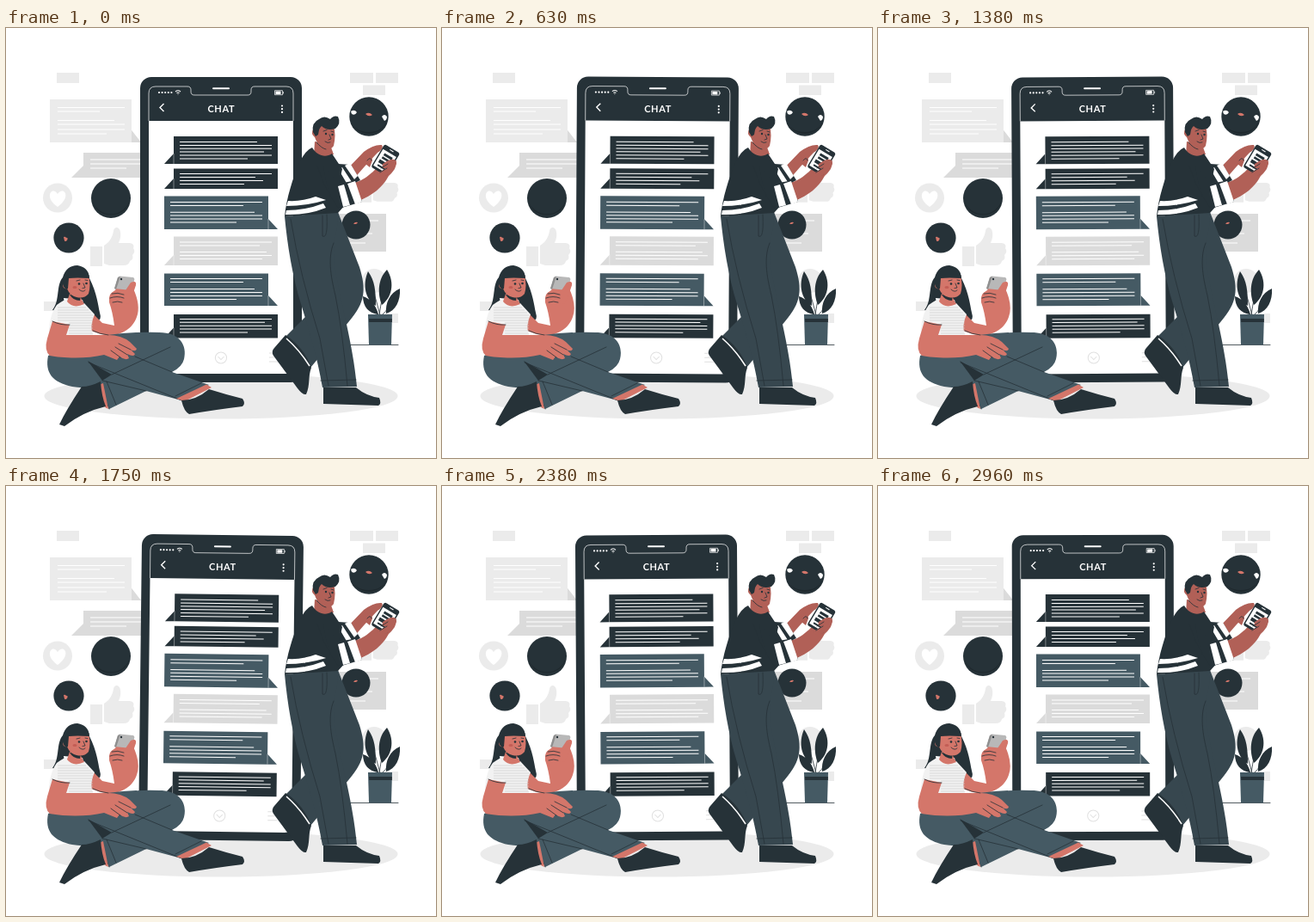
These frames come from a looping animation (500x500 px, 3000 ms). An HTML page:

```html
<!DOCTYPE html>
<html lang="en">
<head>
<meta charset="utf-8">
<title>Chat</title>
<style>
html, body { margin: 0; width: 100%; height: 100%; overflow: hidden; background: #fff; }
svg { display: block; width: 100vw; height: 100vh; }
.ink { fill: #263238; }
.slate { fill: #455a64; }
.navy { fill: #37474f; }
.pale { fill: #ebebeb; }
.grey { fill: #dbdbdb; }
.white { fill: #fff; }
.rose { fill: #d4766a; }
.tan { fill: #b16057; }
.line { fill: none; stroke: #263238; stroke-width: .8; stroke-linecap: round; stroke-linejoin: round; }
.wire { fill: none; stroke: #fff; stroke-width: 1; }
</style>
</head>
<body>
<svg viewBox="0 0 500 500">
  <!-- backdrop -->
  <g class="pale">
    <path d="M59 52h26v12H59zM400 52h27v12H400zM430 52h26v12H430zM415 66.500h26v11.500H415zM44 318h26v11H44zM430 332h26v11H430z"/>
    <path d="M51 83h95v36l11 14H51z"/>
    <circle cx="60" cy="197.500" r="17"/>
    <circle cx="428" cy="294" r="14"/>
    <g id="thumb"><path d="M98 254h14v23H98zM114 253C121 249 124 242 125 236C126 230 132 231 133 237C134 243 132 247 131 250H144Q150 251 148 256Q151 260 147 264Q149 269 144 271Q143 276 137 276H120L114 274z"/></g>
    <use href="#thumb" transform="translate(331 -30) scale(.84)"/>
    <ellipse cx="250" cy="428" rx="205.500" ry="26.500"/>
  </g>
  <path class="white" d="M60 208C43 196 54 183 60 193C67 183 77 196 60 208z"/>
  <path class="grey" d="M146 119L157 133H146zM90 145h76v29H76L90 160zM385 216h57v44h-57z"/>
  <g id="bgText" class="wire"></g>

  <!-- big phone -->
  <g id="phone">
    <rect class="ink" x="156" y="57" width="188" height="355" rx="13"/>
    <path class="white" d="M166 108H334V394Q334 402 326 402H174Q166 402 166 394z"/>
    <path class="wire" stroke-width=".8" d="M166 108V76Q166 68 174 68H211Q215 68 215 72V74Q215 78 219 78H281Q285 78 285 74V72Q285 68 289 68H326Q334 68 334 76V108" style="stroke-width:.7"/>
    <path class="wire" style="stroke-width:2;stroke-linecap:round" d="M241 70.300H259"/>
    <g class="white">
      <circle cx="178" cy="75" r="1.100"/><circle cx="181.600" cy="75" r="1.100"/><circle cx="185.200" cy="75" r="1.100"/><circle cx="188.800" cy="75" r="1.100"/><circle cx="192.400" cy="75" r="1.100"/>
      <circle cx="321" cy="90.500" r="1.100"/><circle cx="321" cy="94.200" r="1.100"/><circle cx="321" cy="97.900" r="1.100"/>
      <path d="M313.500 73.500h6v3.500h-6z"/>
    </g>
    <path class="wire" d="M197 74Q200 71.500 203 74M198.500 75.700Q200 74.500 201.500 75.700M199.600 77H200.400"/>
    <path class="wire" style="stroke-width:.7" d="M312.500 72.700h9v5h-9zM322.500 74v2.500"/>
    <path class="wire" style="stroke-width:1.400" d="M183.500 88L179 92.500L183.500 97"/>
    <text class="white" x="250.300" y="98" text-anchor="middle" font-family="Lato, sans-serif" font-weight="700" font-size="11" letter-spacing=".6">CHAT</text>
    <g id="chat"></g>
    <g fill="none" stroke="#e0e0e0">
      <circle cx="250" cy="383.500" r="6.600"/>
      <path d="M246.500 382L250 385.500L253.500 382M306 378H317M306 383H317M306 388H317"/>
    </g>
  </g>

  <!-- round badges -->
  <g class="ink">
    <circle cx="122" cy="198" r="23"/><circle cx="73" cy="244" r="17.600"/>
    <circle cx="422" cy="103" r="22.700"/><circle cx="407" cy="229" r="16.500"/>
  </g>
  <g fill="#1f292e">
    <path d="M100 200A23 23 0 0 0 144 200Q140 217 122 217Q104 217 100 200zM400 106A22.700 22.700 0 0 0 444 106Q438 121 422 121Q405 121 400 106z"/>
  </g>
  <path class="rose" d="M67 243Q69 242 70 244Q72 243 71.500 246Q70 249 68 247.500zM418 100Q422 97 426 101Q422 104 418 100zM404 227.500Q406 225 409 226Q408 229 404 227.500z"/>
  <path class="white" d="M401 97Q405 94 408 98Q406 102 402 100zM437 103Q440 99 443 103Q443 107 440 108z"/>

  <!-- plant -->
  <path class="line" d="M371 368.500H456M435 334Q431 315 423 297M434 334Q437 312 442 296M434 334Q425 329 419 317M437 334Q446 326 452 312"/>
  <path class="ink" d="M421 283C414 299 418 316 430 323C430 306 429 294 421 283zM443 281C432 292 432 309 437 322C448 314 453 297 443 281zM415 312C415 324 422 332 433 333C430 322 424 315 415 312zM458 303C446 308 441 320 442 332C453 329 459 317 458 303z"/>
  <path class="slate" d="M421 333H449L448 368.500H422z"/>
  <path class="ink" d="M422 338H448.800V342H422.200z"/>

  <!-- standing man -->
  <path class="navy" d="M350 215L386 214L411 278C419 304 418 319 399 341L354 395L325 359L352 332z"/>
  <path class="ink" d="M325 357C339 366 350 380 355 395C351 405 354 415 349 426Q345 427 339 419L311 381Q308 376 312 372z"/>
  <path class="wire" style="stroke-width:1.600" d="M326 361Q341 374 353 393"/>
  <path class="navy" d="M324 219L386 214C387 237 377 252 383 281C389 320 403 364 408 417L368 418C363 386 351 347 343 321C333 289 327 251 324 219z"/>
  <path class="line" d="M373 217C374 238 372 244 368 242V218M381 250C373 269 379 294 383 311Q391 350 397 416M331 222Q342 288 365 361L375 416M366 410L407 409"/>
  <path class="ink" d="M369 418H407Q419 428 434 430Q437 437 433 439L369 437z"/>

  <path class="tan" d="M392 169L416 144Q428 135 437 136Q440 140 432 145L417 161L403 177z"/>
  <path class="ink" d="M371 157L401 159L412 177L386 190z"/>
  <path class="white" d="M387 165L391 162L402 179L397 182zM394 160L400 157L409 172L405 176z"/>
  <path class="tan" d="M359 132L358 149L365 153L381 147L377 136z"/>
  <path class="ink" d="M356 139C362 149 372 151 379 146L391 164L387 181L396 204L386 215L324 219C326 198 334 173 341 157Q348 142 356 139z"/>
  <path class="white" d="M328 201Q344 202 360 196L372 200Q350 207 326 207zM326 212Q348 212 369 204L372 209Q350 218 325 217z"/>
  <path class="ink" d="M369 160L387 181L408 177L414 202L387 210Q373 193 369 160z"/>
  <path class="tan" d="M405 180C423 175 432 160 443 152Q455 149 454 158Q452 166 445 172C438 185 426 195 410 201z"/>
  <path class="white" d="M386 184L393 182L400 206L392 208zM397 181L406 178L414 202L406 205z"/>
  <path class="line" d="M362 160Q369 185 386 209"/>
  <g transform="rotate(31 441 154)">
    <rect class="ink" x="430.500" y="138" width="21" height="31" rx="3"/>
    <path class="white" d="M432 144h18v22h-18z"/>
    <path class="ink" d="M436 147h11v3h-11zM436 151.500h11v2.500h-11zM435 156h11v4h-11zM436 162h11v2h-11z"/>
    <path class="wire" d="M439 140.500h5"/>
  </g>
  <path class="tan" d="M438 158Q449 150 453 154L452 164L440 173Q431 174 432 169L442 163Q436 164 438 158zM419 149Q425 144 426 154L423 162L418 158z"/>
  <path class="line" d="M436 163L444 158M435 168L443 163M420 154Q424 149 425 154"/>

  <path class="tan" d="M360 111L381 114Q384 124 381 137Q377 143 369 140Q362 136 359 127Q354 123 357 118z"/>
  <path class="ink" d="M357 121Q355 110 364 106Q370 101 377 106Q381 101 386 103Q390 111 383 117Q373 120 367 114Q364 116 363 124L360 126z"/>
  <circle class="ink" cx="372" cy="123" r="1.200"/><circle class="ink" cx="379.500" cy="124" r="1.200"/>
  <path class="line" d="M369 120L373 118.500M378 120L381 121M376 124L378 129L375 130M371 132Q374 134.500 377 133M360 119Q358 117 358 121M361 133Q367 140 372 141"/>

  <!-- seated woman -->
  <path class="ink" d="M66 290Q70 276 83 276Q96 278 97 291C106 309 107 322 109 331Q112 340 105 341C96 337 91 326 89 316L67 314Q71 330 54 328C63 317 58 299 66 290z"/>
  <path class="rose" d="M102 333L112 343L126 346Q124 330 120 319Q119 310 127 305L133 294L149 295Q153 297 148 303Q157 323 152 336C147 351 130 361 110 356L93 350z"/>
  <path d="M59 322Q67 316 74 314L91 320L103 333Q97 346 101 357L50 382L50 349Q52 331 59 322z" fill="#f2f2f2"/>
  <g id="stripes" stroke="#c7c7c7" stroke-width=".6"></g>
  <path class="rose" d="M74 309L71 318Q78 327 91 321L86 312z"/>
  <path class="ink" d="M74 310Q78 317 86 317L87 311z"/>
  <path class="rose" d="M70 290Q83 284 96 288Q99 299 96 309Q91 315 82 313Q74 311 71 303Q66 304 66 298Q68 294 71 297z"/>
  <path class="ink" d="M66 298Q66 280 82 277Q96 278 97 291Q82 290 73 291L72 303Q68 305 66 298z"/>
  <circle class="ink" cx="85" cy="297.500" r="1.300"/><circle class="ink" cx="93.500" cy="297" r="1.300"/>
  <path class="line" d="M82 294L86 293M92 293L95 293.500M90 297L92 302L89 302.500M85 304Q89 308 92 305"/>
  <ellipse cx="80" cy="301.500" rx="2.500" ry="1.600" fill="#c25d55"/>
  <path d="M132 288.500L148 290Q150 291 149 294L146 305L126 303L130 290Z" fill="#b8b8b8"/>
  <path d="M130 290L126 303L128 304L133 289z" fill="#8f8f8f"/>
  <circle class="ink" cx="134" cy="292" r="1.200"/>
  <path class="rose" d="M121 310Q126 303 139 305L145 296Q152 293 151 299L147 311L142 321L124 319Q118 318 121 310z"/>
  <path class="line" d="M123 309Q130 307 137 310M121 314Q129 311 137 314M124 319Q130 317 135 319"/>

  <path class="slate" d="M49 381L105 359Q140 353 178 354C202 354 211 369 207 385Q205 394 193 400L236 415L204 433L163 422L120 443L108 415Q93 420 77 417C54 412 45 401 49 381z"/>
  <path class="ink" d="M95 387L123 403L112 410z"/>
  <path class="line" d="M96 389L204 433M112 410L163 422M123 403L191 371M193 400L150 382M108 415L120 443M117 411L128 438M197 428L227 413"/>
  <path class="rose" d="M108 415L113 413L119 443L115 441zM198 431L233 414.500L239 418L208 434z"/>
  <path class="ink" d="M88 417Q98 417 110 411Q111 428 116 440Q90 446 68 463L62 461Q70 444 88 417zM204 433Q221 433 236 420Q255 426 275 431Q279 437 275 440Q242 444 213 449Q207 446 204 433z"/>
  <path class="rose" d="M54 341L74 345L70 357L119 357Q134 357 144 365L152 373Q151 377 145 374L150 379Q149 383 141 379L143 384Q139 387 132 382L129 386L114 380C94 385 65 384 51 381Q44 375 48 361z"/>
  <path class="line" d="M131 367L145 374M127 371L141 380M122 375L133 383M54 341Q64 346 74 345M101 352Q109 356 119 357"/>
</svg>
<script>
const $ = id => document.getElementById(id);
const rules = (x, rows) => rows.map(([y, end]) => `M${x} ${y}H${end}`).join('');

// Messages: top, bottom, colour class, text rows; right-tailed ones start further left
const messages = [
  [126, 158, 'ink', 0, [[132.5, 292], [136.5, 309], [140.3, 309], [144, 300], [148, 309], [152, 281]]],
  [163.5, 187, 'ink', 0, [[169.5, 309], [173.5, 290], [177.500, 299], [181.5, 277]]],
  [195.5, 234, 'slate', 1, [[202.5, 298], [206.5, 276], [214.3, 289], [218, 298], [222, 298], [226, 268]]],
  [242.5, 276, 'grey', 0, [[249, 309], [253, 295], [260.5, 303], [264.5, 309], [268.5, 298]]],
  [285.5, 323, 'slate', 1, [[291.5, 298], [295.5, 276], [303.5, 289], [307.5, 298], [311.5, 298], [315.5, 268]]],
  [333, 360.5, 'ink', 0, [[338.5, 309], [342.3, 301], [346.2, 309], [350, 309], [354, 281]]]
];
$('chat').innerHTML = messages.map(([top, bottom, tone, right, rows]) => {
  const x = right ? 184 : 195, edge = right ? 305 : 195, tip = right ? 316 : 184;
  return `<path class="${tone}" d="M${x} ${top}H${x + 121}V${bottom}H${x}zM${edge} ${bottom - 12}L${tip} ${bottom}H${edge}z"/>
    <path class="wire" style="stroke-width:.4" d="M${edge} ${bottom - 12}V${bottom}"/>
    <path class="wire" d="${rules(x + 7, rows)}"/>`;
}).join('');

$('bgText').innerHTML = `<path d="${
  rules(60, [[92.5, 138], [97, 109], [107.5, 126], [112, 138], [118, 138], [123, 117]]) +
  rules(98, [[153, 158], [158, 158], [163, 140]]) +
  rules(392, [[224, 433], [239, 426], [250, 418]])}"/>`;

let stripes = '';
for (let y = 325; y < 356; y += 3) stripes += `M${y < 342 ? 60 : 73} ${y}H${Math.min(101, y - 232)}`;
$('stripes').innerHTML = `<path d="${stripes}"/>`;

// Linear sway: 0 -> 1 -> -1 -> 0 degrees
function sway(p) {
  return p < .25 ? p * 4 : p < .75 ? 2 - p * 4 : p * 4 - 4;
}
const phone = $('phone');
function draw(now) {
  phone.setAttribute('transform', `rotate(${sway(now % 1500 / 1500)} 250 234.5)`);
  requestAnimationFrame(draw);
}
const start = performance.now();
draw(0);
function draw0() {}
</script>
</body>
</html>
```
